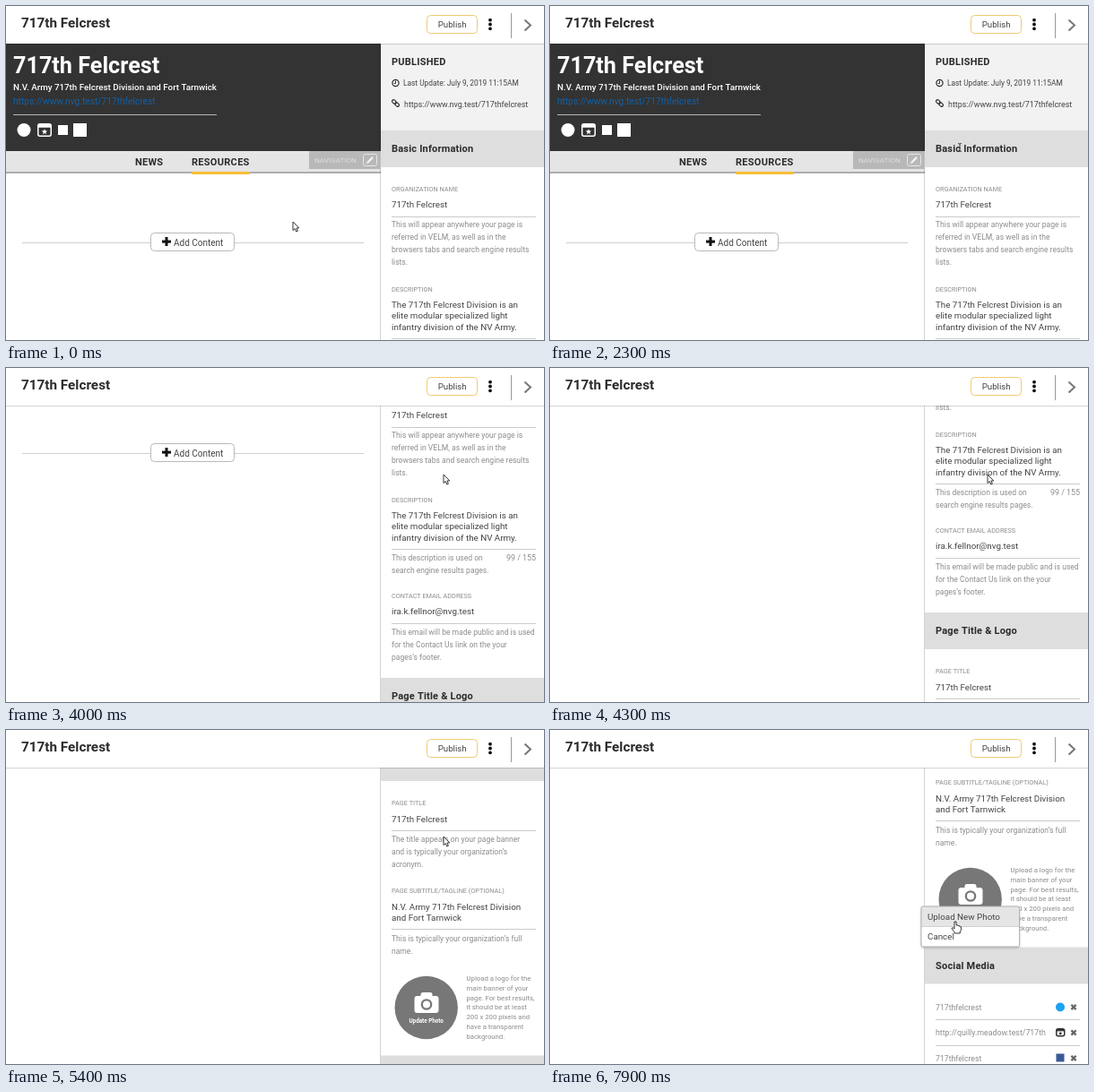
An HTML page with a canvas for the animation above (8 s loop, 600 by 373 pixels).

```html
<!DOCTYPE html>
<html lang="en">
<head>
<meta charset="utf-8">
<title>Page editor</title>
<style>
html, body { margin: 0; width: 600px; height: 373px; overflow: hidden; background: #fff; }
canvas { display: block; }
</style>
</head>
<body>
<canvas id="stage" width="600" height="373"></canvas>
<script>
const ctx = document.getElementById('stage').getContext('2d');
const LOOP = 8000;
const SANS = 'Roboto, "Open Sans", sans-serif';
const INK = '#2b2b2b', SOFT = '#444', GREY = '#8c8c8c', GOLD = '#f7bf35';
const EDGE = 'rgba(0,0,0,.17)';
const UNIT = '717th Felcrest';
const TAGLINE = ['N.V. Army 717th Felcrest Division', 'and Fort Tarnwick'];
const LINK = 'https://www.nvg.test/717thfelcrest';
const HANDLE = '717thfelcrest';

// Wheel notches: start times, travel and duration of each
const NOTCHES = [3050, 3265, 3430, 4080, 4230, 4380, 4950, 5100, 5250, 5420, 5720];
const STEP = 620 / NOTCHES.length, GLIDE = 200;

// Pointer path: time, x, y
const PATH = [
  [950, 320, 241], [1850, 444, 172], [2300, 457, 158], [2750, 474, 139],
  [3250, 478, 132], [3650, 488, 119], [6050, 488, 119], [6750, 470, 185],
  [7350, 469, 190], [7800, 452, 214]
];
const MENU_AT = 7100;

const ease = p => p * p * (3 - 2 * p);
const clamp = v => Math.max(0, Math.min(1, v));

function scrollAt(t) {
  return NOTCHES.reduce((y, n) => y + STEP * ease(clamp((t - n) / GLIDE)), 0);
}

function pointerAt(t) {
  const i = PATH.findIndex(k => k[0] > t);
  if (i === 0) return PATH[0].slice(1);
  if (i < 0) return PATH[PATH.length - 1].slice(1);
  const [t0, x0, y0] = PATH[i - 1], [t1, x1, y1] = PATH[i];
  const p = ease((t - t0) / (t1 - t0));
  return [x0 + (x1 - x0) * p, y0 + (y1 - y0) * p];
}

function text(s, x, y, size, color = INK, weight = 400, gap = 0, align = 'left') {
  ctx.font = `${weight} ${size}px ${SANS}`;
  ctx.letterSpacing = gap + 'px';
  ctx.textAlign = align;
  ctx.fillStyle = color;
  ctx.fillText(s, x, y);
}

function lines(list, x, y, lead, size, color) {
  list.forEach((s, i) => text(s, x, y + i * lead, size, color));
}

function box(x, y, w, h, color) {
  ctx.fillStyle = color;
  ctx.fillRect(x, y, w, h);
}

function disc(x, y, r, color) {
  ctx.fillStyle = color;
  ctx.beginPath();
  ctx.arc(x, y, r, 0, 7);
  ctx.fill();
}

function round(x, y, w, h, r, fill, stroke, lw = 1) {
  ctx.beginPath();
  ctx.roundRect(x, y, w, h, r);
  if (fill) { ctx.fillStyle = fill; ctx.fill(); }
  if (stroke) { ctx.strokeStyle = stroke; ctx.lineWidth = lw; ctx.stroke(); }
}

function poly(points, color, lw, fill) {
  ctx.beginPath();
  for (let i = 0; i < points.length; i += 2) ctx.lineTo(points[i], points[i + 1]);
  if (fill) { ctx.closePath(); ctx.fillStyle = fill; ctx.fill(); }
  ctx.strokeStyle = color;
  ctx.lineWidth = lw;
  ctx.stroke();
}

function windowIcon(x, y, w, h, color) {
  round(x + .75, y + .75, w - 1.5, h - 1.5, 2, null, color, 1.5);
  box(x + 1, y + 1, w - 2, h * .25, color);
}

function star(x, y, r, color) {
  ctx.beginPath();
  for (let i = 0; i < 10; i++) {
    const a = i * Math.PI / 5 - Math.PI / 2, q = i % 2 ? r * .45 : r;
    ctx.lineTo(x + q * Math.cos(a), y + q * Math.sin(a));
  }
  ctx.fillStyle = color;
  ctx.fill();
}

function banner() {
  box(0, 42, 418, 120, '#333');
  text(UNIT, 8, 74.5, 25.2, '#fff', 700);
  text(TAGLINE.join(' '), 8, 94, 9.8, '#fff', 500);
  text(LINK, 8, 109.5, 10.2, '#1261a8');
  box(8, 121, 227, 1, '#b5b5b5');
  disc(20, 138.5, 7.5, '#fff');
  windowIcon(35, 131, 16, 15, '#fff');
  star(43, 140.5, 3.3, '#fff');
  box(58, 133, 11, 11, '#fff');
  box(75, 131, 15, 15, '#fff');
}

function tabs() {
  box(0, 162, 418, 24, '#e6e5e6');
  box(0, 185, 418, 2, '#adadad');
  text('NEWS', 144, 177.5, 11, INK, 700, .25);
  text('RESOURCES', 207, 177.5, 11, INK, 700, .3);
  box(207, 185, 65, 3, GOLD);
  box(338, 162, 79, 20, '#b8b8b8');
  text('NAVIGATION', 344, 175, 8.1, '#dedede');
  round(398.5, 165.5, 15, 13, 2, null, '#e6e6e6');
  poly([403, 175, 409, 169], '#f2f2f2', 2.4);
  poly([402, 176.3, 403.5, 174.8], '#f2f2f2', 1);
}

function adder() {
  box(18, 264, 381, 1, '#cfcfcf');
  round(161.5, 253.5, 93, 20, 4, '#fff', '#b8b8b8');
  box(174, 261.6, 10, 3, '#111');
  box(177.5, 258, 3, 10, '#111');
  text('Add Content', 187, 267.5, 10, SOFT);
}

function band(title, y) {
  box(418, y, 182, 41, '#dedede');
  text(title, 430, y + 24, 11, INK, 700, .2);
}

const label = (s, y) => text(s, 430, y, 7.3, GREY);
const rule = y => box(430, y, 161, 1, '#cbcbcb');
const value = (list, y) => lines(list, 430, y, 12.3, 9.8, SOFT);
const help = (list, y) => lines(list, 430, y, 14, 8.55, GREY);

function cross(x, y) {
  poly([x - 2.6, y - 2.6, x + 2.6, y + 2.6], '#666', 2.2);
  poly([x + 2.6, y - 2.6, x - 2.6, y + 2.6], '#666', 2.2);
}

function status() {
  box(418, 42, 182, 97, '#f2f2f3');
  text('PUBLISHED', 430, 66, 11, INK, 700, .25);
  ctx.beginPath();
  ctx.arc(434.5, 86, 3.6, 0, 7);
  ctx.strokeStyle = INK;
  ctx.lineWidth = 1.2;
  ctx.stroke();
  poly([434.5, 83.7, 434.5, 86.5, 432.8, 86.5], INK, 1);
  text('Last Update: July 9, 2019 11:15AM', 443, 89.3, 8.35, SOFT);
  ctx.save();
  ctx.translate(434.5, 108.5);
  ctx.rotate(.75);
  round(-4.8, -1.7, 5.2, 3.4, 1.7, null, INK, 1.2);
  round(-.4, -1.7, 5.2, 3.4, 1.7, null, INK, 1.2);
  ctx.restore();
  text(LINK, 444, 112.6, 8.9, SOFT);
}

function photo() {
  disc(468.7, 809, 35.2, '#777');
  round(455.5, 796, 27, 19, 3, '#fff');
  round(462.5, 792, 13, 8, 2.5, '#fff');
  disc(469, 805.5, 6.3, '#777');
  disc(469, 805.5, 4, '#fff');
  text('Update Photo', 468.7, 825.5, 6.3, '#fff', 700, 0, 'center');
  lines(['Upload a logo for the', 'main banner of your', 'page. For best results,',
    'it should be at least', '200 x 200 pixels and', 'have a transparent', 'background.'],
    513.5, 779, 10.8, 7.75, GREY);
}

function social() {
  band('Social Media', 862.5);
  text(HANDLE, 430, 932.5, 8.7, GREY);
  disc(569, 929.5, 5, '#1da1f2');
  rule(943);
  text('http://quilly.meadow.test/717th', 430, 961, 8.8, GREY);
  windowIcon(564, 953, 10.5, 9.5, '#333');
  disc(569.3, 959, 1.4, '#333');
  rule(972);
  text(HANDLE, 430, 989.5, 8.7, GREY);
  box(564.5, 981.5, 9, 9, '#3b5998');
  [929.5, 958, 986.5].forEach(y => cross(584, y));
}

function panel() {
  status();
  band('Basic Information', 139);
  label('ORGANIZATION NAME', 206.5);
  value([UNIT], 225);
  rule(235);
  help(['This will appear anywhere your page is', 'referred in VELM, as well as in the',
    'browsers tabs and search engine results', 'lists.'], 247);
  label('DESCRIPTION', 318.5);
  value(['The 717th Felcrest Division is an', 'elite modular specialized light',
    'infantry division of the NV Army.'], 337);
  rule(371);
  help(['This description is used on', 'search engine results pages.'], 383.5);
  text('99 / 155', 591, 383.5, 8.9, GREY, 400, 0, 'right');
  label('CONTACT EMAIL ADDRESS', 425.5);
  value(['ira.k.fellnor@nvg.test'], 444);
  rule(454);
  help(['This email will be made public and is used', 'for the Contact Us link on the your',
    'pages\u2019s footer.'], 467.3);
  band('Page Title & Logo', 515);
  label('PAGE TITLE', 582.5);
  value([UNIT], 601.5);
  rule(611);
  help(['The title appears on your page banner', 'and is typically your organization\u2019s',
    'acronym.'], 623.5);
  label('PAGE SUBTITLE/TAGLINE (OPTIONAL)', 680.5);
  value(TAGLINE, 699.5);
  rule(721);
  help(['This is typically your organization\u2019s full', 'name.'], 734.5);
  photo();
  social();
}

function header() {
  box(0, 0, 600, 42, '#fff');
  box(0, 42, 600, 1, EDGE);
  text(UNIT, 17, 24.3, 15.3, INK, 700);
  round(469.5, 10.5, 56, 20, 4, '#fff', '#efcb72');
  text('Publish', 497.7, 24, 9.7, SOFT, 400, 0, 'center');
  [15.7, 20.5, 25.3].forEach(y => disc(540, y, 1.9, '#111'));
  box(563, 8, 1, 28, '#999');
  poly([578.5, 15.5, 585, 21.5, 578.5, 27.5], '#777', 2);
}

function menu(hover) {
  ctx.save();
  ctx.shadowColor = 'rgba(0,0,0,.3)';
  ctx.shadowBlur = 3;
  ctx.shadowOffsetY = 1;
  round(414, 197, 109.5, 45, 2, '#fff');
  ctx.restore();
  if (hover) box(414, 197, 109.5, 22.5, '#e5e5e5');
  box(414, 219, 109.5, 1, '#d0d0d0');
  round(414, 197, 109.5, 45, 2, null, '#b3b3b3');
  text('Upload New Photo', 421, 211.5, 9.8, SOFT);
  text('Cancel', 421, 234, 9.8, SOFT);
}

function arrow() {
  poly([0, 0, 0, 9.6, 2.2, 7.6, 3.8, 11, 5.4, 10.3, 3.9, 7, 6.8, 7, 0, 0], '#222', .9, '#fff');
}

function beam() {
  poly([-2, -4.5, 0, -4, 2, -4.5], '#333', .9);
  poly([0, -4, 0, 4], '#333', .9);
  poly([-2, 4.5, 0, 4, 2, 4.5], '#333', .9);
}

function hand() {
  ctx.lineJoin = 'round';
  poly([-1, 0, 1, 0, 1.2, 4, 3, 4, 3.3, 4.8, 5, 4.8, 5.3, 5.6, 6.5, 5.8, 6.7, 9,
    5.3, 11, 5.3, 13, -1, 13, -1.2, 11.4, -4, 7.8, -3.2, 6.6, -1, 8], '#222', .9, '#fff');
  ctx.lineJoin = 'miter';
}

function pointer(x, y, scroll, open) {
  const onHeading = scroll === 0 && x > 430 && x < 521 && y > 150 && y < 168;
  const onPhoto = scroll > 619 && Math.hypot(x - 468.7, y - 189) < 35;
  const onMenu = open && y > 197;
  ctx.save();
  ctx.translate(x, y);
  if (onHeading) beam();
  else if (onPhoto || onMenu) hand();
  else arrow();
  ctx.restore();
}

function draw(t) {
  const scroll = scrollAt(t), [x, y] = pointerAt(t), open = t >= MENU_AT;
  box(0, 0, 600, 373, '#fff');
  ctx.save();
  ctx.translate(0, -Math.round(scroll));
  banner();
  tabs();
  adder();
  panel();
  ctx.restore();
  box(417, 42, 1, 331, EDGE);
  header();
  if (open) menu(y > 197);
  pointer(x, y, scroll, open);
}

const start = performance.now();
function tick() {
  draw((performance.now() - start) % LOOP);
  requestAnimationFrame(tick);
}
tick();
</script>
</body>
</html>
```
